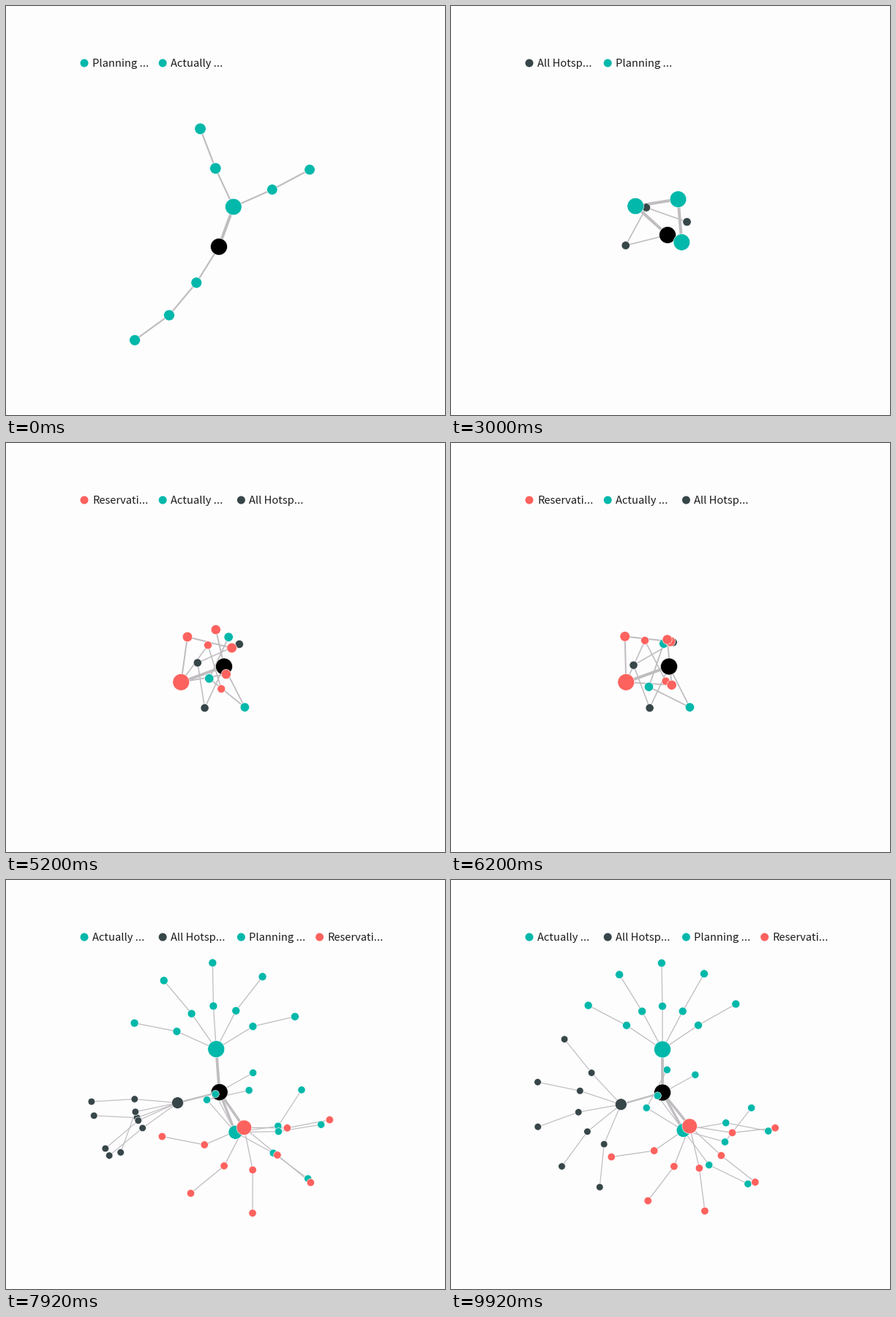
These frames come from a looping animation (600 px wide and 559 px high, 9.96 s). A matplotlib script:

```python
import numpy as np
import matplotlib.pyplot as plt
from matplotlib.animation import FuncAnimation
from matplotlib.collections import LineCollection

W, H, DPI = 600, 559, 64
PT = 72 / DPI  # points per pixel
STEP, LOOP = 40, 9960

TEAL, DARK, RED, BLACK = "#01b8aa", "#374649", "#fd625e", "#000000"
PAPER, LINK, INK = "#fefdfe", "#c0bdc0", "#1c1c1c"

PLAN = ("Planning ...", TEAL)
ACTUAL = ("Actually ...", TEAL)
SPOTS = ("All Hotsp...", DARK)
BOOKED = ("Reservati...", RED)

# Relaxation time in ms by depth: root, hubs, inner nodes, leaves.
RELAX = np.array([300, 320, 520, 800])


def arc(heading, spread):
    """Five evenly spaced directions around a heading."""
    return heading + spread * np.arange(-2, 3)


def fan(colour, hub, width, radius, start, rest):
    """Five two-link chains on a hub; start and rest give (inner, outer) angles."""
    chains = [(width, radius, *zip(begin, end))
              for begin, end in zip(zip(*start), zip(*rest))]
    return colour, hub, chains


class Scene:
    """A tree of equal links. Groups are (colour, hub, chains); a hub or chain is
    (link width, node radius, *directions), a direction being degrees clockwise
    from the right, or a pair (start, rest)."""

    def __init__(self, start, known, legend, root, groups,
                 link=59, grow=1.0, slack=0.08):
        self.start, self.known, self.legend = start, known, legend
        self.root = np.array(root, float).reshape(-1, 2)
        self.link, self.grow, self.slack = link, grow, slack
        # parent, depth, start angle, rest angle, colour, radius, link width
        self.nodes = [(0, 0, 0, 0, BLACK, 11.5, 0)]
        for colour, hub, chains in groups:
            base = self.add_chain(0, colour, *hub) if hub else 0
            for chain in chains:
                self.add_chain(base, colour, *chain)
        (self.parents, depth, begin, end,
         self.colours, radii, widths) = map(list, zip(*self.nodes))
        self.depth = np.minimum(depth, 3)
        self.begin, self.end = np.radians(begin), np.radians(end)
        self.sizes = (2 * PT * np.array(radii)) ** 2
        self.line_widths = PT * np.array(widths[1:])

    def add_chain(self, parent, colour, width, radius, *directions):
        for direction in directions:
            begin, end = np.broadcast_to(direction, 2)
            depth = self.nodes[parent][1] + 1
            self.nodes.append((parent, depth, begin, end, colour, radius, width))
            parent = len(self.nodes) - 1
        return parent

    def place(self, t):
        """Node positions at time t, built link by link from the root."""
        fade = np.exp(-max(0, t - self.known) / RELAX)[self.depth]
        angle = self.end + (self.begin - self.end) * fade
        grown = min(1, (t - self.start) / max(1, self.known - self.start))
        length = self.link * (self.grow + (1 - self.grow) * grown)
        unfold = self.slack * (t - self.known) / 1000

        xy = np.zeros((len(self.nodes), 2))
        xy[0] = self.root[-1] + (self.root[0] - self.root[-1]) * fade[0]
        for n, p in enumerate(self.parents[1:], 1):
            a = angle[n]
            if p:  # links slowly straighten towards the one before
                bend = (angle[p] - a + np.pi) % (2 * np.pi) - np.pi
                a += unfold * bend
            xy[n] = xy[p] + length * np.array([np.cos(a), np.sin(a)])
        return xy


SCENES = [
    Scene(0, 0, [PLAN, ACTUAL], (291, 329), [
        (TEAL, (4, 11.3, -70), [(2.2, 7.7, -115, -111), (2.2, 7.2, -24, -28)]),
        (TEAL, None, [(2.2, 7.4, 122, 130, 144)]),
    ], link=58),
    Scene(1520, 1920, [SPOTS, PLAN], (296, 313), [
        (DARK, None, [(1.6, 5.7, 166, -49, 26)]),
        (TEAL, None, [(4, 11.3, 222, 3, 93)]),
    ], grow=0.9),
    Scene(3200, 3800, [SPOTS, PLAN, BOOKED], (319, 321.5), [
        (DARK, (4, 11.5, 188), [
            (2.1, 7.1, -107, -63), (1.3, 5.2, -50, 102), (2, 6.7, 17, -82)]),
        (TEAL, None, [(2.3, 7.8, 47, 206, -57)]),
        (RED, (3.6, 10.5, 155), [(2.2, 7.6, 188, 230), (1.9, 6.6, -62, -7)]),
    ], grow=0.5),
    Scene(4720, 5200, [BOOKED, ACTUAL, SPOTS], (298, 305.5), [
        (DARK, None, [(1.6, 5.6, 115, 261, -24)]),
        (TEAL, None, [(1.8, 6.2, 63, 219, -65)]),
        (RED, (4, 11.4, 160), [
            (2, 6.8, -82, 14), (1.6, 5.5, -54, 73), (1.9, 6.6, -10, -103)]),
    ], link=62.5, grow=0.75),
    Scene(6320, 7200, [ACTUAL, SPOTS, PLAN, BOOKED], [(319, 284.5), (289, 290.5)], [
        fan(DARK, (2.4, 8, (180, 164)), 1.2, 4.8,
            start=([-57, -206, -247, -285, -304], [-39, -197, -253, -380, -270]),
            rest=(arc(-190, 29), arc(-198, 37))),
        fan(TEAL, (3.8, 11.5, (-131, -90)), 1.3, 5.5,
            start=(arc(-105, 40), arc(-91, 52)),
            rest=(arc(-90, 28), arc(-91, 30))),
        fan(TEAL, (3.4, 9.5, (131, 61)), 1.2, 5.1,
            start=([-78, -89, -3, -52, -47], [65, -30, -165, 59, 53]),
            rest=([-149, -127, -10, 16, 54], [-66, -29, 17, -56, 25])),
        fan(RED, (3.5, 10.3, (91, 51)), 1.3, 5.2,
            start=(arc(83, -54), arc(102, -60)),
            rest=(arc(77, -34), arc(82, -44))),
    ], grow=0.3, slack=0),
]

fig = plt.figure(figsize=(W / DPI, H / DPI), dpi=DPI, facecolor=PAPER)
ax = fig.add_axes([0, 0, 1, 1])
ax.set_xlim(0, W)
ax.set_ylim(H, 0)
ax.axis("off")

links = ax.add_collection(LineCollection([], colors=LINK, zorder=1))
nodes = ax.scatter([], [], edgecolors="white", linewidths=0.6 * PT, zorder=2)
dots = ax.scatter([], [], s=(11 * PT) ** 2, linewidths=0, zorder=3)
labels = [ax.text(118 + 107.2 * k, 83.3, "", color=INK, va="baseline",
                  fontname="Noto Sans CJK JP", fontsize=14.7 * PT)
          for k in range(4)]


def held_time(i):
    """Pictures are held in turn for 120 and 80 ms."""
    base, rest = divmod(i * STEP, 200)
    return base * 200 + (120 if rest >= 120 else 0)


def update(i):
    t = held_time(i)
    scene = [s for s in SCENES if s.start <= t][-1]
    xy = scene.place(t)
    links.set_segments(np.stack([xy[scene.parents], xy], axis=1)[1:])
    links.set_linewidths(scene.line_widths)
    nodes.set_offsets(xy)
    nodes.set_sizes(scene.sizes)
    nodes.set_facecolors(scene.colours)

    legend = scene.legend
    dots.set_offsets([(107 + 107.2 * k, 78) for k in range(len(legend))])
    dots.set_facecolors([colour for _, colour in legend])
    for k, label in enumerate(labels):
        label.set_text(legend[k][0] if k < len(legend) else "")
    return [links, nodes, dots, *labels]


anim = FuncAnimation(fig, update, frames=LOOP // STEP, interval=STEP,
                     repeat=True, repeat_delay=0, blit=False)
plt.show()
```
